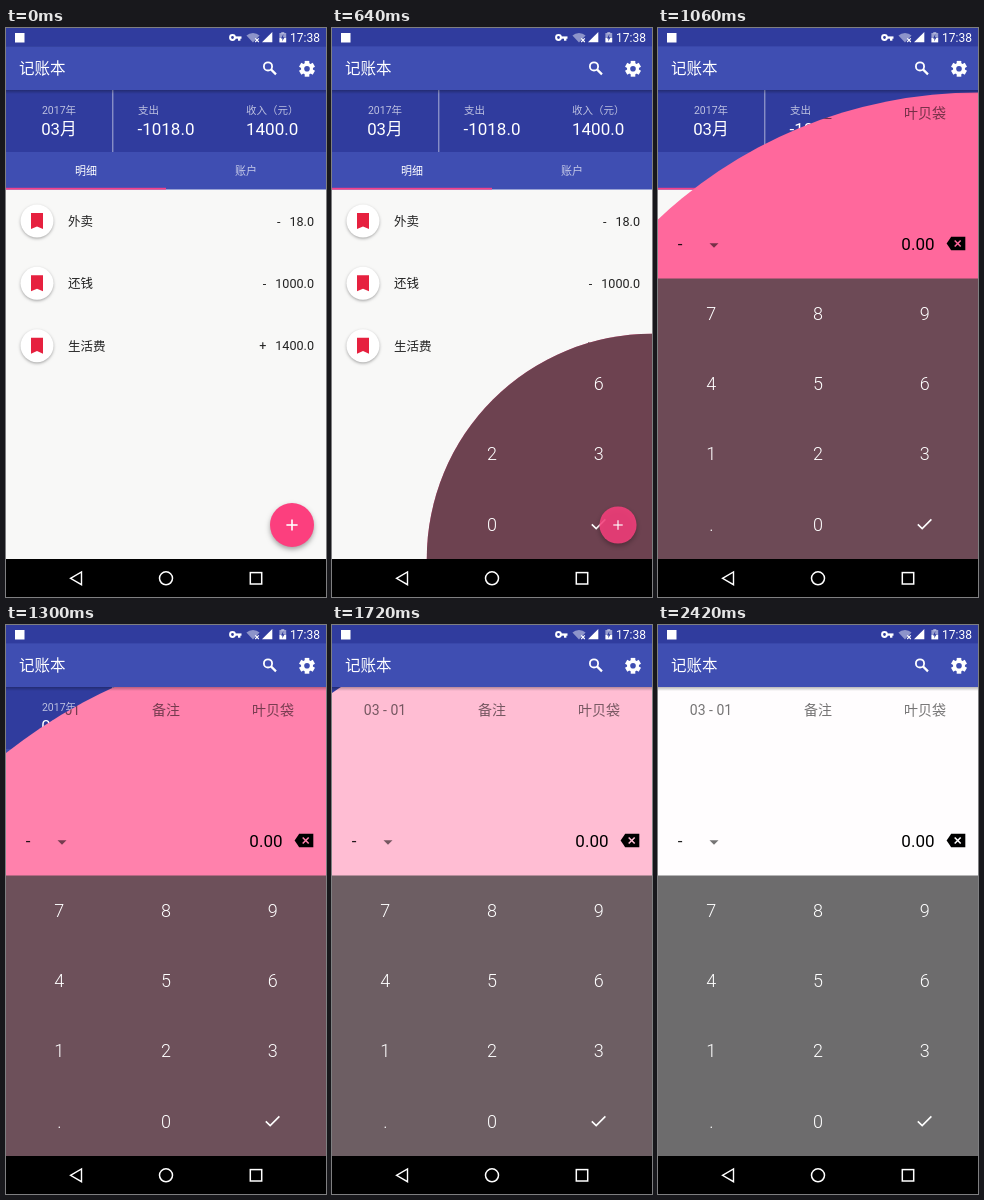
An HTML page with a canvas that plays this animation: 320x569 px, repeating every 2520 ms.

```html
<!DOCTYPE html>
<html lang="zh-CN">
<head>
<meta charset="utf-8">
<title>记账本</title>
<style>
html, body { margin: 0; width: 100%; height: 100%; overflow: hidden; background: #000; }
canvas { display: block; width: 320px; height: 569px; }
</style>
</head>
<body>
<canvas id="stage"></canvas>
<script>
const W = 320, H = 569, TOP = 62, BOTTOM = 531, KEYS_TOP = 250.5;
const LOOP = 2520, LAST_STEP = 46;
const PRIMARY = '#3f4eb2', DARK = '#303c9e', ACCENT = '#fc3f7e', PAPER = '#f8f8f7';
const FONT = "Roboto, 'Noto Sans CJK SC', 'Noto Sans CJK', sans-serif";

const canvas = document.getElementById('stage');
const ctx = canvas.getContext('2d');
const ratio = window.devicePixelRatio || 1;
canvas.width = W * ratio;
canvas.height = H * ratio;

const clamp = v => Math.min(1, Math.max(0, v));

// cubic-bezier(x1, 0, x2, 1)
function ease(x, x1, x2) {
  x = clamp(x);
  let lo = 0, hi = 1;
  for (let i = 0; i < 24; i++) {
    const s = (lo + hi) / 2, q = 1 - s;
    if (3 * q * q * s * x1 + 3 * q * s * s * x2 + s * s * s < x) lo = s;
    else hi = s;
  }
  return 3 * lo * lo - 2 * lo * lo * lo;
}

function rect(x, y, w, h, color) {
  ctx.fillStyle = color;
  ctx.fillRect(x, y, w, h);
}

function disc(x, y, r, color) {
  ctx.fillStyle = color;
  ctx.beginPath();
  ctx.arc(x, y, r, 0, Math.PI * 2);
  ctx.fill();
}

function trace(points, close) {
  ctx.beginPath();
  points.forEach(([x, y], i) => i ? ctx.lineTo(x, y) : ctx.moveTo(x, y));
  if (close) ctx.closePath();
}

function poly(points, color) {
  trace(points, true);
  ctx.fillStyle = color;
  ctx.fill();
}

function line(points, color, width, close) {
  trace(points, close);
  ctx.strokeStyle = color;
  ctx.lineWidth = width;
  ctx.stroke();
}

function ring(x, y, r, color, width) {
  ctx.strokeStyle = color;
  ctx.lineWidth = width;
  ctx.beginPath();
  ctx.arc(x, y, r, 0, Math.PI * 2);
  ctx.stroke();
}

function cross(x, y, r, color, width) {
  line([[x - r, y - r], [x + r, y + r]], color, width);
  line([[x - r, y + r], [x + r, y - r]], color, width);
}

function text(str, x, y, size, color, align = 'left', weight = 400) {
  ctx.font = `${weight} ${size}px ${FONT}`;
  ctx.textAlign = align;
  ctx.fillStyle = color;
  ctx.fillText(str, x, y);
  return ctx.measureText(str).width;
}

function withShadow(blur, dy, alpha, draw) {
  ctx.save();
  ctx.shadowColor = `rgba(0,0,0,${alpha})`;
  ctx.shadowBlur = blur * ratio;
  ctx.shadowOffsetY = dy * ratio;
  draw();
  ctx.restore();
}

function statusBar() {
  rect(0, 0, W, 18.5, DARK);
  rect(9, 5, 9.5, 9.5, '#fff');
  // key
  ring(226.5, 9.5, 2.4, '#fff', 2);
  rect(229, 8.4, 6.5, 2.3, '#fff');
  rect(232, 9.5, 2.4, 3.2, '#fff');
  // wifi
  ctx.fillStyle = 'rgba(255,255,255,.45)';
  ctx.beginPath();
  ctx.moveTo(247, 14.5);
  ctx.arc(247, 14.5, 9.6, -Math.PI * 0.74, -Math.PI * 0.26);
  ctx.fill();
  cross(251, 12.2, 1.8, '#fff', 1.1);
  // signal and battery
  poly([[256, 14.3], [266.3, 14.3], [266.3, 4]], '#fff');
  rect(275.3, 4, 3, 1.5, 'rgba(255,255,255,.5)');
  rect(273.4, 5, 6.8, 5, 'rgba(255,255,255,.5)');
  rect(273.4, 10, 6.8, 4.4, '#fff');
  poly([[277.4, 6], [275, 10.4], [276.5, 10.4], [276.1, 13.4], [278.6, 9.2], [277, 9.2]], DARK);
  text('17:38', 314, 13.7, 12, '#fff', 'right');
}

function toolbar() {
  rect(0, 18.5, W, TOP - 18.5, PRIMARY);
  text('记账本', 13, 46, 15.5, '#fff', 'left', 500);
  ring(262, 38.4, 4.1, '#fff', 1.8);
  line([[265, 41.4], [270, 46.4]], '#fff', 2.2);
  const x = 301, y = 40.8;
  for (let i = 0; i < 3; i++) {
    const a = Math.PI / 6 + i * Math.PI / 3;
    const dx = Math.cos(a) * 7.9, dy = Math.sin(a) * 7.9;
    line([[x - dx, y - dy], [x + dx, y + dy]], '#fff', 4.6);
  }
  disc(x, y, 6, '#fff');
  disc(x, y, 2.8, PRIMARY);
}

function toolbarShadow() {
  const g = ctx.createLinearGradient(0, TOP, 0, TOP + 4);
  g.addColorStop(0, 'rgba(0,0,0,.28)');
  g.addColorStop(1, 'rgba(0,0,0,0)');
  rect(0, TOP, W, 4, g);
}

function entry(y, label, sign, amount) {
  withShadow(3, 1.2, 0.32, () => disc(31, y, 16.5, '#fff'));
  poly([[25, y - 8], [37, y - 8], [37, y + 8], [31, y + 5.4], [25, y + 8]], '#e6213f');
  text(label, 62, y + 4.8, 12.5, '#222');
  const w = text(amount, 308, y + 4.6, 12.6, '#222', 'right');
  text(sign, 308 - w - 9, y + 4.6, 12.6, '#222', 'right');
}

function ledger() {
  const dim = 'rgba(255,255,255,.68)';
  rect(0, TOP, W, BOTTOM - TOP, PAPER);
  rect(0, TOP, W, 62, DARK);
  rect(106.3, TOP, 1, 62, 'rgba(255,255,255,.6)');
  text('2017年', 53, 86, 10.5, dim, 'center');
  text('03月', 53, 107, 16.8, '#fff', 'center');
  text('支出', 132, 86, 10.5, dim);
  text('-1018.0', 131.5, 107, 17, '#fff');
  text('收入（元）', 240, 86, 10.5, dim);
  text('1400.0', 240, 107, 17, '#fff');
  rect(0, 124, W, 37.5, PRIMARY);
  text('明细', 80, 147, 11, '#fff', 'center', 500);
  text('账户', 240, 147, 11, 'rgba(255,255,255,.7)', 'center');
  rect(0, 159.8, 160, 1.8, '#f2408a');
  entry(193, '外卖', '-', '18.0');
  entry(255.3, '还钱', '-', '1000.0');
  entry(317.7, '生活费', '+', '1400.0');
}

function keypad() {
  rect(0, KEYS_TOP, W, BOTTOM - KEYS_TOP, 'rgba(65,65,65,.77)');
  ['789', '456', '123', '.0'].forEach((row, r) => {
    const y = 285.4 + r * 70.25;
    [...row].forEach((key, c) => text(key, 53.3 + c * 106.7, y + 6.4, 18, '#fff', 'center', 300));
  });
  line([[259.8, 496.4], [264.2, 500.6], [273.4, 491.4]], '#fff', 1.6);
}

function entryForm(radius, tint) {
  const mix = c => Math.round(255 + (c - 255) * tint);
  const back = `rgb(255,${mix(64)},${mix(129)})`;
  const soft = 'rgba(0,0,0,.54)';
  ctx.save();
  ctx.beginPath();
  ctx.rect(0, TOP, W, BOTTOM - TOP);
  ctx.clip();
  ctx.beginPath();
  ctx.arc(W, BOTTOM, radius, 0, Math.PI * 2);
  ctx.clip();
  rect(0, TOP, W, BOTTOM - TOP, back);
  text('03 - 01', 53, 89.5, 14, soft, 'center');
  text('备注', 160, 89.8, 14, soft, 'center');
  text('叶贝袋', 267, 89.8, 14, soft, 'center');
  text('-', 22, 222, 17, 'rgba(0,0,0,.87)', 'center');
  poly([[51.5, 215.2], [60.5, 215.2], [56, 219.8]], soft);
  text('0.00', 276.5, 222, 17, '#000', 'right');
  poly([[288.6, 215.5], [293.2, 208.8], [307.3, 208.8], [307.3, 222.2], [293.2, 222.2]], '#000');
  cross(299.7, 215.5, 3, back, 1.6);
  keypad();
  ctx.restore();
}

function addButton(hide) {
  if (hide >= 1) return;
  ctx.save();
  ctx.globalAlpha = 1 - hide;
  ctx.translate(286, 497);
  ctx.scale(1 - hide, 1 - hide);
  withShadow(5, 2.5, 0.35, () => disc(0, 0, 22, ACCENT));
  line([[-5.6, 0], [5.6, 0]], '#fff', 1.6);
  line([[0, -5.6], [0, 5.6]], '#fff', 1.6);
  ctx.restore();
}

function navBar() {
  rect(0, BOTTOM, W, H - BOTTOM, '#000');
  line([[64.5, 550.3], [75.5, 543.9], [75.5, 556.7]], '#fff', 1.4, true);
  ring(160, 550.3, 6.5, '#fff', 1.5);
  ctx.strokeRect(244.3, 544.6, 11.4, 11.4);
}

// Steps come in threes: two short ones of 20 ms, then a hold of 100 ms.
function stepAt(t) {
  if (t < 220) return -1;
  const u = t - 180, rest = u % 140;
  const part = rest < 20 ? 0 : rest < 40 ? 1 : 2;
  return Math.min(LAST_STEP, Math.floor(u / 140) * 3 + part - 2);
}

function render(t) {
  const step = stepAt(t);
  ctx.setTransform(ratio, 0, 0, ratio, 0, 0);
  statusBar();
  toolbar();
  ledger();
  if (step >= 0) {
    const radius = Math.hypot(W, BOTTOM - TOP) * ease((step + 3.2) / 39.3, 0.4, 0.2);
    const tint = (1 + Math.cos(Math.PI * clamp((step - 4.6) / 44))) / 2;
    entryForm(radius + 0.5, tint);
  }
  toolbarShadow();
  addButton(ease((step - 6.4) / 8, 0.4, 1));
  navBar();
}

const start = performance.now();
function tick() {
  render((performance.now() - start) % LOOP);
  requestAnimationFrame(tick);
}
tick();
</script>
</body>
</html>
```
